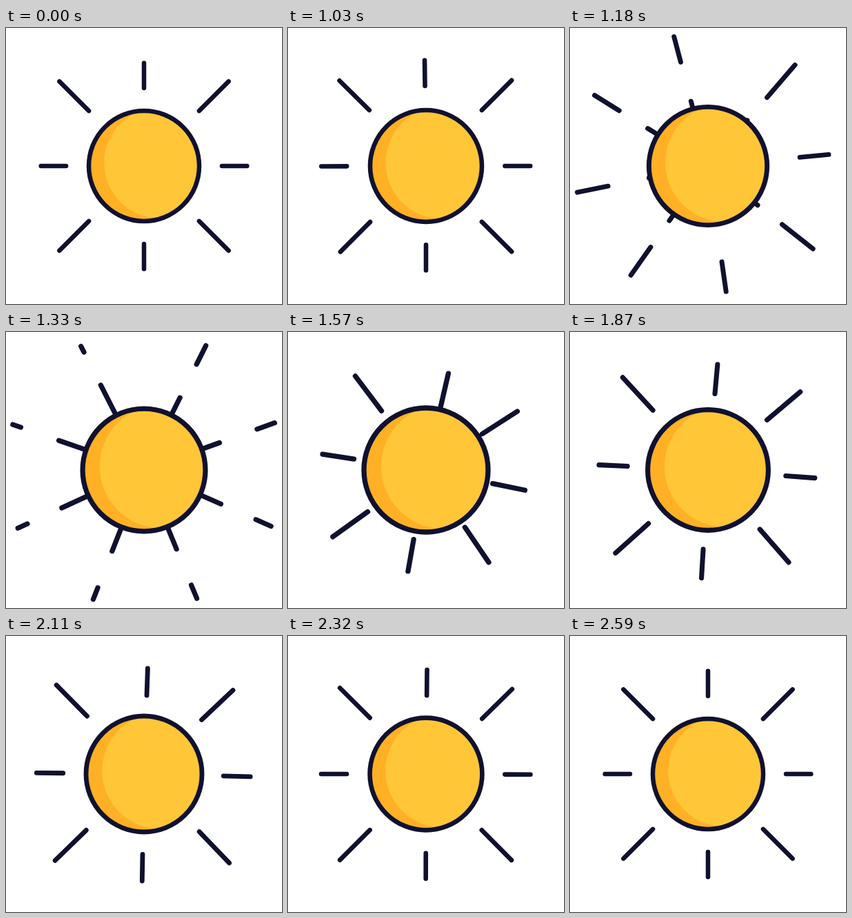
Animation, 400 px wide and 400 px high, one loop 2.62 s. Source, as an HTML page:

```html
<!DOCTYPE html>
<html lang="en">
<head>
<meta charset="utf-8">
<title>Sun</title>
<style>
  html, body { margin: 0; width: 100%; height: 100%; overflow: hidden; background: #fff; }
  svg { display: block; width: 100vw; height: 100vh; }
  .ink { fill: none; stroke: #10112f; stroke-width: 6.5; stroke-linecap: round; }
</style>
</head>
<body>
<svg viewBox="0 0 400 400">
  <clipPath id="disc"><circle r="80"/></clipPath>
  <g transform="translate(200 200)">
    <g id="sun">
      <g id="rays" class="ink"></g>
      <circle r="80" fill="#ffb024"/>
      <circle cx="22.5" cy="-4.5" r="80.3" fill="#ffc637" clip-path="url(#disc)"/>
      <circle r="80" class="ink"/>
    </g>
  </g>
</svg>
<script>
  const LOOP = 2620, HOLD = 1030, STEP = 30, STEPS = 53;
  const PEAK = 16, SWELL = 0.127;
  const REACH = 181, INNER = 113, TRAVEL = 99;
  const SHORT = 36.3, LONG = 60.4;

  const sun = document.getElementById('sun');
  const group = document.getElementById('rays');
  const rays = Array.from({ length: 8 }, () => {
    const line = document.createElementNS('http://www.w3.org/2000/svg', 'line');
    line.setAttribute('y2', -REACH);
    return group.appendChild(line);
  });

  const clamp = v => Math.min(1, Math.max(0, v));
  const mix = (a, b, k) => a + (b - a) * k;

  // cubic-bezier(.18, 0, .05, 1)
  function ease(x) {
    if (x <= 0 || x >= 1) return clamp(x);
    let lo = 0, hi = 1;
    for (let k = 0; k < 30; k++) {
      const u = (lo + hi) / 2, v = 1 - u;
      if (0.54 * u * v * v + 0.15 * u * u * v + u * u * u < x) lo = u;
      else hi = u;
    }
    return lo * lo * (3 - 2 * lo);
  }

  function swell(n) {
    return n < PEAK
      ? Math.sin(n / PEAK * Math.PI / 2)
      : (1 + Math.cos((n - PEAK) / (STEPS - PEAK) * Math.PI)) / 2;
  }

  // Each ray turns into its neighbour's place while a new dash follows it out.
  function drawRay(line, i, n) {
    const start = -0.6 + i * 0.37, end = 43.9 + i * 1.3;
    const p = n ? ease((n - start) / (end - start)) : 0;
    const [from, to] = i % 2 ? [LONG, SHORT] : [SHORT, LONG];
    const dash = mix(from, to, p);
    const lead = INNER - TRAVEL * (1 - p);
    // The dash in front is one travel length ahead and ends at the line's tip.
    line.setAttribute('stroke-dasharray', [0, lead, dash, TRAVEL - dash, dash, 999].join(' '));
    line.setAttribute('transform', `rotate(${-45 * (i + p)})`);
  }

  function draw(now) {
    const t = now % LOOP;
    const n = t < HOLD ? 0 : Math.min(STEPS, Math.floor((t - HOLD) / STEP) + 1);
    sun.setAttribute('transform', `scale(${1 + SWELL * swell(n)})`);
    rays.forEach((line, i) => drawRay(line, i, n));
    requestAnimationFrame(draw);
  }

  draw(0);
</script>
</body>
</html>
```
